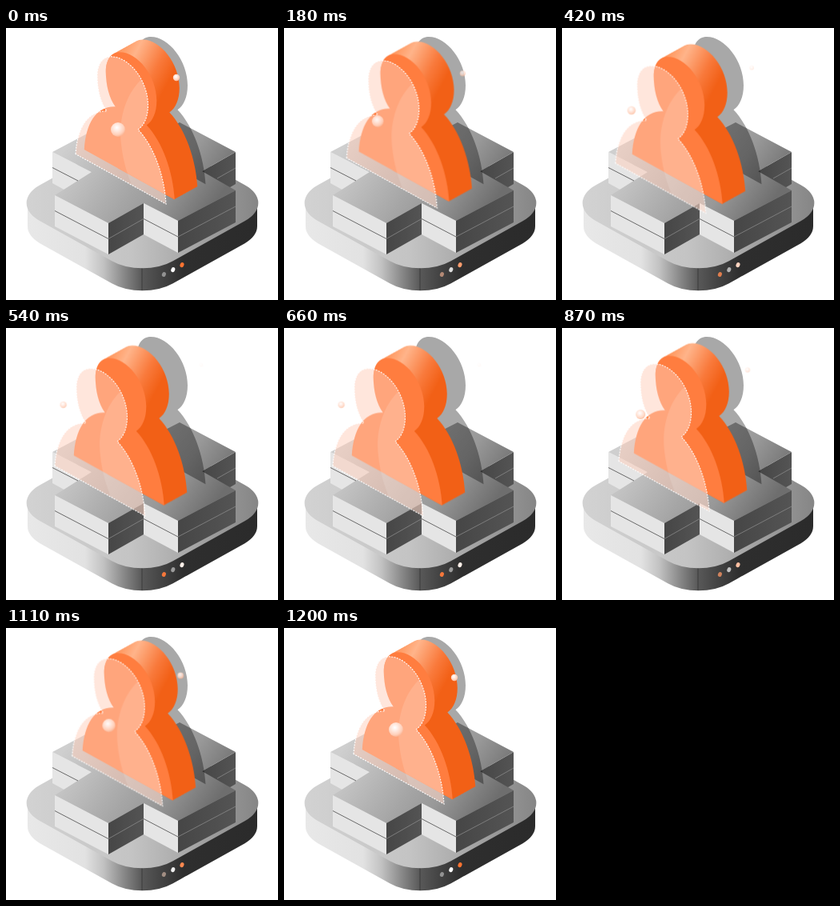
These frames come from a looping animation (340x340 px, 1.93 s). An HTML page:

```html
<!DOCTYPE html>
<html lang="en">
<head>
<meta charset="utf-8">
<title>Isometric user</title>
<style>
  html, body { margin: 0; width: 100%; height: 100%; overflow: hidden; background: #fff; }
  svg { display: block; width: 100%; height: 100%; }
  .move, .light { animation: move 1930ms steps(20, end) -2ms infinite; }
  .light { animation-name: light; }
  #body { --to: translate(-14.5px, 8.2px); }
  #glass { --to: translate(-29px, 16.5px); }
  #big { --to: translate(-76px, -34.5px) scale(.4); --fade: .75; }
  #small { --to: translate(34.5px, -17.5px) scale(.5); --fade: 0; }
  /* out for 600 ms, back for 600 ms, then rest */
  @keyframes move {
    0%, 62.176%, 100% { transform: translate(0, 0) scale(1); opacity: 1; }
    31.088% { transform: var(--to); opacity: var(--fade, 1); }
  }
  @keyframes light {
    0%, 62.176%, 100% { fill: var(--a); }
    31.088% { fill: var(--b); }
  }
</style>
</head>
<body>
<svg viewBox="0 0 340 340">
  <defs>
    <path id="person" d="M87 157.5C89 125 102 103 126 104C118 93 114 77 114 60C114 46 120 35.8 131.5 35.8C154 35.8 177.5 66 177.5 96.5C177.5 111 172.5 122 165 127C185 148 198 185 200 220Z"/>
    <clipPath id="sweep"></clipPath>
    <clipPath id="inGlass"><use href="#person"/></clipPath>
    <linearGradient id="rim" gradientUnits="userSpaceOnUse" x1="27" x2="314" y1="0" y2="0">
      <stop offset="0" stop-color="#e8e8e8"/><stop offset=".25" stop-color="#e2e2e2"/>
      <stop offset=".33" stop-color="#c2c2c2"/><stop offset=".42" stop-color="#888"/>
      <stop offset=".5" stop-color="#585858"/><stop offset=".58" stop-color="#444"/>
      <stop offset=".68" stop-color="#2e2e2e"/><stop offset="1" stop-color="#2b2b2b"/>
    </linearGradient>
    <linearGradient id="plate" gradientUnits="userSpaceOnUse" x1="27" x2="314" y1="0" y2="0">
      <stop offset="0" stop-color="#d2d2d2"/><stop offset=".45" stop-color="#c4c4c4"/>
      <stop offset="1" stop-color="#868686"/>
    </linearGradient>
    <linearGradient id="top" gradientUnits="userSpaceOnUse" x1="80" y1="140" x2="240" y2="250">
      <stop offset="0" stop-color="#cfcfcf"/><stop offset=".5" stop-color="#a6a6a6"/>
      <stop offset=".7" stop-color="#989898"/><stop offset="1" stop-color="#6e6e6e"/>
    </linearGradient>
    <linearGradient id="dark" x1="0" x2="1" y1="0" y2="0">
      <stop offset="0" stop-color="#464646"/><stop offset="1" stop-color="#545454"/>
    </linearGradient>
    <linearGradient id="side" gradientUnits="userSpaceOnUse" x1="128" y1="30" x2="212" y2="75">
      <stop offset="0" stop-color="#ff8644"/><stop offset=".32" stop-color="#ffb48a"/>
      <stop offset=".65" stop-color="#f97a3c"/><stop offset=".88" stop-color="#f26016"/>
    </linearGradient>
    <radialGradient id="ball" cx=".42" cy=".36" r=".62">
      <stop offset="0" stop-color="#fff"/><stop offset=".3" stop-color="#ffeee7"/>
      <stop offset=".8" stop-color="#ffd0ba"/><stop offset="1" stop-color="#fbb899"/>
    </radialGradient>
  </defs>

  <path fill="url(#rim)" d="M27 218.7V246.7A54 31 0 0 0 42.5 269.2L132.3 319.2A54 31 0 0 0 208.7 319.2L298.5 269.2A54 31 0 0 0 314 246.7V218.7Z"/>
  <path fill="url(#plate)" d="M42.5 196.2A54 31 0 0 0 42.5 241.2L132.3 291.2A54 31 0 0 0 208.7 291.2L298.5 241.2A54 31 0 0 0 298.5 196.2L208.7 146.2A54 31 0 0 0 132.3 146.2Z"/>
  <path stroke="#303030" stroke-width=".7" d="M170 300.5V328"/>

  <path fill="#e5e5e5" d="M58 155L107 180V208L78 205L58 194Z"/>
  <path fill="url(#dark)" d="M245 179L287 155V195L270 205L245 190Z"/>
  <path fill="url(#top)" d="M58 155L128 118L172 141L217 118L287 155L245 179L287 203L215 241L172 219L128 244L61 209L107 180Z"/>
  <g fill="#e5e5e5">
    <path d="M61 209L128 244V283L61 248Z"/>
    <path d="M172 219L215 241V281L172 258Z"/>
  </g>
  <g fill="url(#dark)">
    <path d="M128 244L172 219V258L128 283Z"/>
    <path d="M215 241L287 203V243L215 281Z"/>
  </g>
  <g fill="none" stroke-width=".8">
    <path stroke="#4b4b4b" d="M58 174.5L90 191M61 228.5L128 263.5M172 238.5L215 261"/>
    <path stroke="#8a8a8a" d="M287 175L264 188M128 263.5L172 238.5M215 261L287 223"/>
  </g>

  <ellipse class="light" style="--a:#929292;--b:#ff7431" transform="translate(197.4 308) rotate(22)" rx="2.4" ry="3.1"/>
  <ellipse class="light" style="--a:#fff;--b:#929292" transform="translate(208.8 302.2) rotate(22)" rx="2.4" ry="3.1"/>
  <ellipse class="light" style="--a:#ff7431;--b:#fff" transform="translate(220 296.2) rotate(22)" rx="2.4" ry="3.1"/>

  <use href="#person" x="49.5" y="-24.8" fill-opacity=".34"/>

  <g id="body" class="move">
    <path fill="url(#side)" clip-path="url(#sweep)" d="M120 0H260V240H140V60H120Z"/>
    <use href="#person" x="10.8" y="-5.6" fill="#ff7d3f"/>
  </g>

  <g id="glass" class="move">
    <use href="#person" fill="#ffcdb9" fill-opacity=".5"/>
    <path clip-path="url(#inGlass)" fill="#fff" fill-opacity=".13" d="M172 62C150 80 140 115 144 145C146 165 152 185 159 200L210 230V62Z"/>
    <use href="#person" fill="none" stroke="#fff" stroke-width="1.1" stroke-dasharray="2 1.4"/>
  </g>

  <g transform="translate(140 127)"><circle id="big" class="move" r="9" fill="url(#ball)"/></g>
  <g transform="translate(213 62)"><circle id="small" class="move" r="4.2" fill="url(#ball)"/></g>
</svg>
<script>
  // Sweep the silhouette backwards to form the solid body.
  const sweep = document.getElementById('sweep');
  const steps = 36;
  for (let i = 0; i <= steps; i++) {
    const copy = document.createElementNS('http://www.w3.org/2000/svg', 'use');
    copy.setAttribute('href', '#person');
    copy.setAttribute('x', 10.8 + 28.5 * i / steps);
    copy.setAttribute('y', -5.6 - 15.8 * i / steps);
    sweep.append(copy);
  }
</script>
</body>
</html>
```
